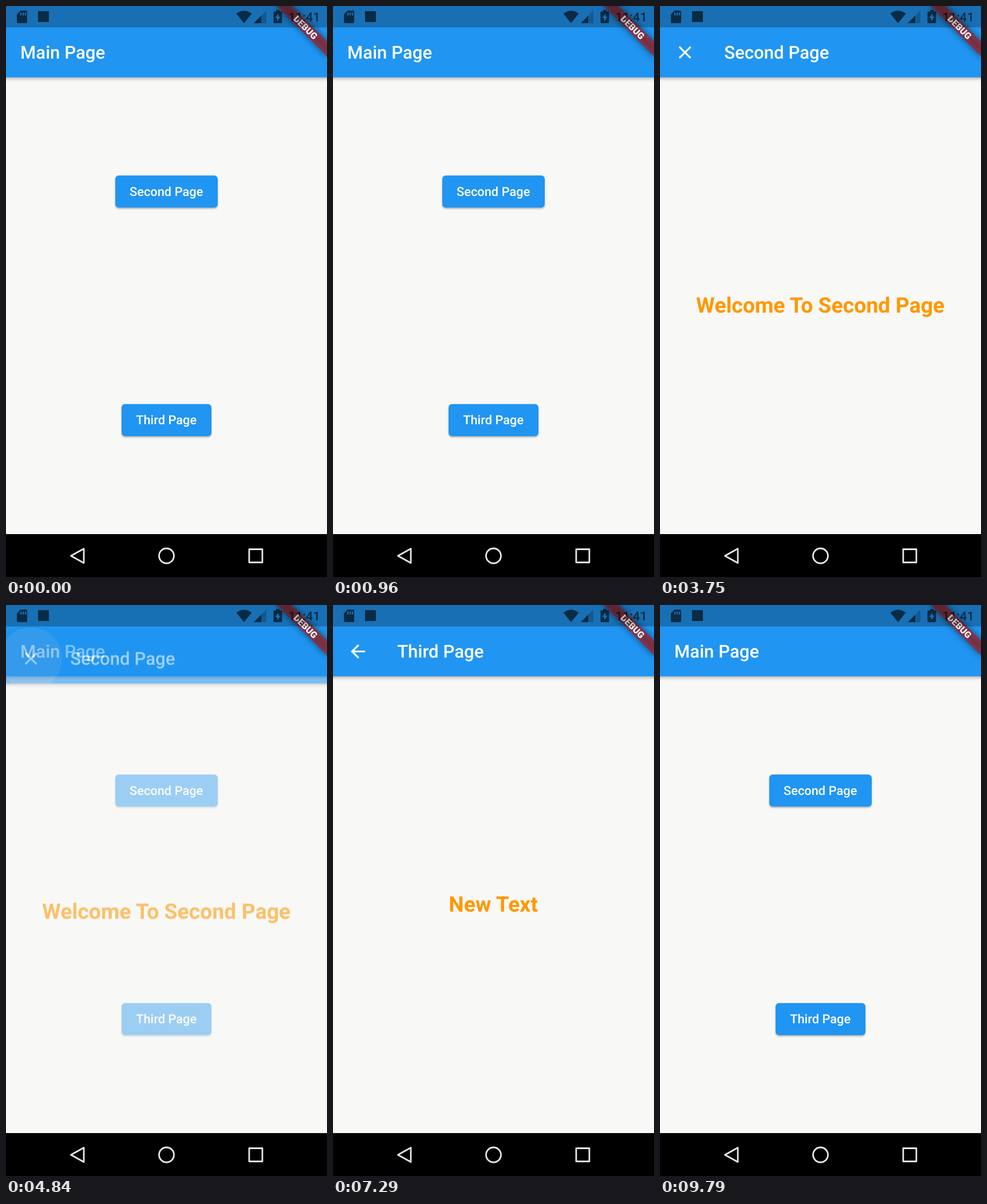
An HTML page for the animation above (10 s loop, 561 by 998 pixels).

```html
<!DOCTYPE html>
<html lang="en">
<head>
<meta charset="utf-8">
<title>Page transitions</title>
<style>
  html, body { margin: 0; width: 100%; height: 100%; overflow: hidden; background: #000; }
  svg {
    display: block; width: 561px; height: 998px;
    font-family: Roboto, sans-serif; text-rendering: geometricPrecision;
  }

  .paper { fill: #f8f8f7; }
  .blue { fill: #2095f1; }
  .bar { filter: drop-shadow(0 2px 3px rgba(0, 0, 0, .32)); }
  .button { filter: drop-shadow(0 2px 1.5px rgba(0, 0, 0, .3)); }
  .title { font-size: 31.17px; font-weight: 500; fill: #fff; }
  .label { font-size: 21.82px; font-weight: 500; fill: #fff; text-anchor: middle; }
  .welcome { font-size: 37.4px; font-weight: 700; fill: #ff9800; text-anchor: middle; }
  .debug { font-size: 15.9px; font-weight: 900; fill: #fff; text-anchor: middle; }
  .clock { font-size: 21.82px; font-weight: 500; }
  .status { fill: #000; fill-opacity: .62; }
  .nav { fill: none; stroke: #e8e8e8; stroke-width: 2.8; stroke-linejoin: round; }

  /* A page rises and fades in over 300 ms, stays, then leaves the same way in reverse. */
  .page {
    opacity: 0;
    animation: slide 10s var(--at) infinite, fade 10s var(--at) infinite;
  }
  @keyframes slide {
    0% { transform: translateY(230.75px); animation-timing-function: cubic-bezier(.4, 0, .2, 1); }
    3% { transform: none; animation-timing-function: linear; }
    29.66% { transform: none; animation-timing-function: cubic-bezier(.8, 0, .6, 1); }
    32.66%, 100% { transform: translateY(230.75px); }
  }
  @keyframes fade {
    0% { opacity: 0; animation-timing-function: cubic-bezier(.42, 0, 1, 1); }
    3% { opacity: 1; animation-timing-function: linear; }
    29.66% { opacity: 1; animation-timing-function: cubic-bezier(0, 0, .58, 1); }
    32.66%, 100% { opacity: 0; }
  }

  /* Touch ripples */
  .ripple {
    --ink: .25;
    fill: #c8c8c8;
    opacity: 0;
    transform-box: fill-box;
    transform-origin: center;
    animation: grow 10s linear var(--at) infinite, vanish 10s linear var(--at) infinite;
  }
  .small { --ink: .4; animation-name: growSmall, vanish; }
  @keyframes grow { 0% { transform: scale(0); } .63%, 100% { transform: none; } }
  @keyframes growSmall { 0% { transform: scale(0); } .35%, 100% { transform: none; } }
  @keyframes vanish { 0% { opacity: var(--ink); } 2%, 100% { opacity: 0; } }
</style>
</head>
<body>
<svg viewBox="0 0 561 998">
  <defs>
    <clipPath id="barClip"><rect width="561" height="124.7"/></clipPath>
    <clipPath id="secondClip"><rect x="191" y="296.2" width="179" height="56" rx="6"/></clipPath>
    <clipPath id="thirdClip"><rect x="202" y="695.7" width="157" height="56" rx="6"/></clipPath>
    <filter id="soft" x="-30%" y="-120%" width="160%" height="340%"><feGaussianBlur stdDeviation="6"/></filter>
    <g id="base">
      <rect class="paper" width="561" height="923"/>
      <rect class="blue bar" x="-12" y="-12" width="585" height="136.7"/>
    </g>
  </defs>

  <g>
    <use href="#base"/>
    <text class="title" x="25" y="92">Main Page</text>

    <rect class="blue button" x="191" y="296.2" width="179" height="56" rx="6"/>
    <g clip-path="url(#secondClip)">
      <circle class="ripple" style="--at: 1580ms" cx="296" cy="325" r="106"/>
    </g>
    <text class="label" x="280.2" y="332">Second Page</text>

    <rect class="blue button" x="202" y="695.7" width="157" height="56" rx="6"/>
    <g clip-path="url(#thirdClip)">
      <circle class="ripple" style="--at: 5943ms" cx="296" cy="723" r="98"/>
    </g>
    <text class="label" x="280.2" y="731.3">Third Page</text>
  </g>

  <g class="page" style="--at: 1790ms">
    <use href="#base"/>
    <g clip-path="url(#barClip)">
      <circle class="ripple small" style="--at: 4750ms" cx="43.6" cy="81" r="54.5"/>
    </g>
    <path fill="#fff" transform="translate(24.9 62.4) scale(1.5583)"
      d="M19 6.41 17.59 5 12 10.59 6.41 5 5 6.41 10.59 12 5 17.59 6.41 19 12 13.41 17.59 19 19 17.59 13.41 12z"/>
    <text class="title" x="112.2" y="92">Second Page</text>
    <text class="welcome" x="280.2" y="536">Welcome To Second Page</text>
  </g>

  <g class="page" style="--at: 6154ms">
    <use href="#base"/>
    <g clip-path="url(#barClip)">
      <circle class="ripple small" style="--at: 9114ms" cx="43.6" cy="81" r="54.5"/>
    </g>
    <path fill="#fff" transform="translate(24.9 62.4) scale(1.5583)"
      d="M20 11H7.83l5.59-5.59L12 4l-8 8 8 8 1.41-1.41L7.83 13H20z"/>
    <text class="title" x="112.2" y="92">Third Page</text>
    <text class="welcome" x="280.2" y="536">New Text</text>
  </g>

  <g transform="translate(561 0) rotate(45)">
    <rect x="-62.3" y="43.6" width="124.7" height="18.7" fill-opacity=".5" filter="url(#soft)"/>
    <rect x="-62.3" y="43.6" width="124.7" height="18.7" fill="#b71c1c" fill-opacity=".627"/>
    <text class="debug" x="0" y="58.6">DEBUG</text>
  </g>

  <rect width="561" height="37.4" fill-opacity=".25"/>
  <g class="status">
    <path fill-rule="evenodd" d="M25.5 8H35q2 0 2 2v18q0 2-2 2H21q-2 0-2-2V14.5zM25 11.5v5h2.3v-5zM29 11.5v5h2.3v-5zM33 11.5v5h2.3v-5z"/>
    <rect x="56" y="9" width="19" height="19"/>
    <path d="M416 30 402.5 13.3Q416 3 429.5 13.3z"/>
    <path fill-opacity=".2" d="M455 8V30H446V17z"/>
    <path d="M446 17V30H433z"/>
    <path fill-rule="evenodd" d="M472 7h6v2.5h3q1.5 0 1.5 1.5v17.5q0 1.5-1.5 1.5h-12q-1.5 0-1.5-1.5v-17.5q0-1.5 1.5-1.5h3zM476.3 13 470.5 21h3.4v6l5.8-8.5h-3.4z"/>
    <text class="clock" x="493.5" y="27">11:41</text>
  </g>

  <rect y="923" width="561" height="75"/>
  <g class="nav">
    <path d="M113.5 961 136 948.5V973.5z"/>
    <circle cx="280.5" cy="961" r="13"/>
    <rect x="425" y="949.5" width="23" height="23"/>
  </g>
</svg>
</body>
</html>
```
